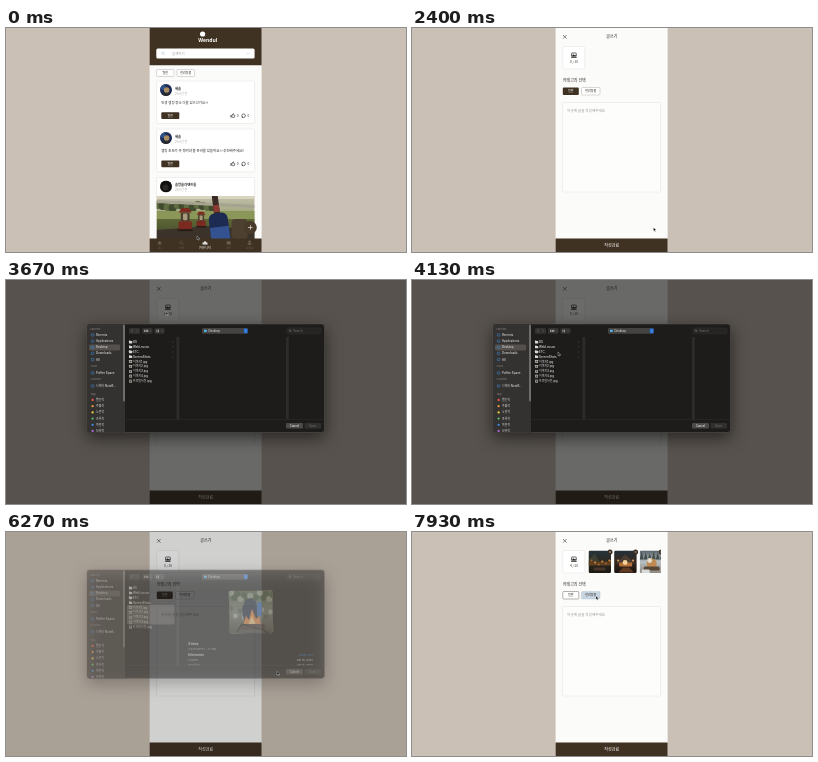
Animation, 400 px wide and 224 px high, one loop 8 s. Source, as an HTML page with a canvas:

```html
<!DOCTYPE html>
<html lang="ko">
<head>
<meta charset="utf-8">
<title>Camping community</title>
<style>
html, body { margin: 0; width: 100%; height: 100%; overflow: hidden; background: #cbc0b5; }
canvas { display: block; width: 400px; height: 224px; }
</style>
</head>
<body>
<canvas id="stage"></canvas>
<script>
const LOOP = 8000;
const BEIGE = '#cbc0b5', BROWN = '#403223', PAPER = '#fbfbfa', LINE = '#e2e1df', INK = '#2b2723', GREY = '#9b9996';
const KR = '"Noto Sans CJK KR", "Noto Sans CJK JP", "Noto Sans CJK", sans-serif';
const UI = 'Inter, "Noto Sans CJK KR", "Noto Sans CJK JP", sans-serif';

const canvas = document.getElementById('stage');
const ctx = canvas.getContext('2d');
const ratio = window.devicePixelRatio || 1;
canvas.width = 400 * ratio;
canvas.height = 224 * ratio;

const clamp = v => Math.max(0, Math.min(1, v));
const span = (t, a, b) => clamp((t - a) / (b - a));
const ease = p => p * p * (3 - 2 * p);

// Keys are [time, value, value, ...]
function track(keys, t) {
  let i = 0;
  while (i < keys.length - 2 && t >= keys[i + 1][0]) i++;
  const a = keys[i], b = keys[i + 1];
  const p = ease(span(t, a[0], b[0]));
  return a.slice(1).map((v, k) => v + (b[k + 1] - v) * p);
}

function box(x, y, w, h, r, fill, stroke, width = 0.5) {
  ctx.beginPath();
  ctx.roundRect(x, y, w, h, r);
  if (fill) { ctx.fillStyle = fill; ctx.fill(); }
  if (stroke) { ctx.strokeStyle = stroke; ctx.lineWidth = width; ctx.stroke(); }
}

function dot(x, y, r, fill, stroke, width = 0.5) {
  ctx.beginPath();
  ctx.arc(x, y, r, 0, 7);
  if (fill) { ctx.fillStyle = fill; ctx.fill(); }
  if (stroke) { ctx.strokeStyle = stroke; ctx.lineWidth = width; ctx.stroke(); }
}

function poly(points, fill, stroke, width = 0.5) {
  ctx.beginPath();
  for (let i = 0; i < points.length; i += 2) ctx.lineTo(points[i], points[i + 1]);
  if (fill) { ctx.fillStyle = fill; ctx.fill(); }
  if (stroke) { ctx.strokeStyle = stroke; ctx.lineWidth = width; ctx.stroke(); }
}

// Text is set large and scaled down so that small sizes keep their true widths
function text(s, x, y, size, color, align = 'left', weight = 400, font = KR) {
  ctx.save();
  ctx.translate(x, y);
  ctx.scale(size / 40, size / 40);
  ctx.font = `${weight} 40px ${font}`;
  ctx.textAlign = align;
  ctx.textBaseline = 'alphabetic';
  ctx.fillStyle = color;
  ctx.fillText(s, 0, 14);
  ctx.restore();
}
const ui = (s, x, y, color = '#dcdbd9', size = 2.9, align = 'left', weight = 500) =>
  text(s, x, y, size, color, align, weight, UI);

function clipped(x, y, w, h, r, draw) {
  ctx.save();
  ctx.beginPath();
  ctx.roundRect(x, y, w, h, r);
  ctx.clip();
  draw();
  ctx.restore();
}

function fade(x, y, w, h, ...colors) {
  const g = ctx.createLinearGradient(0, y, 0, y + h);
  colors.forEach((c, i) => g.addColorStop(i / (colors.length - 1), c));
  ctx.fillStyle = g;
  ctx.fillRect(x, y, w, h);
}

function lens(x, y, r, color) {
  dot(x, y, r, null, color, 0.45);
  poly([x + r * 0.7, y + r * 0.7, x + r * 1.7, y + r * 1.7], null, color, 0.45);
}

function chip(label, x, y, w, h, style) {
  const [fill, stroke, color] = {
    dark: [BROWN, null, '#fff'],
    light: ['#fff', '#b5b1ac', INK],
    strong: ['#fff', '#6e655c', INK],
    blue: ['#c8d5e2', '#b9c6d3', INK]
  }[style];
  box(x, y, w, h, 1, fill, stroke);
  text(label, x + w / 2, y + h / 2, 3.05, color, 'center', 500);
}

// ---- list page ----

function lantern(x, y, s) {
  ctx.save();
  ctx.translate(x, y);
  ctx.scale(s, s);
  poly([0, 5, 3, 1, 9, 1, 12, 5], '#7d2a20');
  box(2, 5, 8, 8, 1, '#4b3d30');
  box(4, 6, 4, 6, 1, '#a99a7c');
  box(0, 13, 12, 8, 1, '#7a2a20');
  box(-1, 20, 14, 2, 1, '#2e1c17');
  ctx.restore();
}

function beachPhoto(y) {
  clipped(151, y, 98, 78, 0, () => {
    fade(151, y, 98, 34, '#c2c1ad', '#a3a67f', '#6d7747');
    box(151, y, 98, 3, 0, '#d9d4bf');
    for (let i = 0; i < 12; i++) dot(152 + i * 5, y + 9 + (i * 5) % 4, 4, i % 2 ? '#3f4b2c' : '#5f6b41');
    poly([151, y + 4, 249, y + 9, 249, y + 12, 151, y + 7], '#a6a391');
    box(151, y + 15, 98, 9, 0, '#8b9659');
    fade(151, y + 23, 98, 55, '#5d6736', '#3a3b26', '#25241c');
    poly([151, y + 34, 205, y + 30, 249, y + 34, 249, y + 78, 151, y + 78], '#3b332a');
    lantern(173, y + 11, 1.1);
    lantern(191, y + 15, 0.75);
    ctx.save();
    ctx.translate(212, y + 22);
    ctx.rotate(-0.13);
    box(-3, -23, 6, 22, 2, '#3a2a25');
    box(-3, -13, 6, 7, 1, '#8a3a33');
    box(-9, -5, 19, 60, 6, '#1d2b52');
    box(-9, 9, 19, 16, 0, '#34528f');
    ctx.restore();
    box(226, y + 23, 16, 20, 4, '#4d4030');
  });
}

function actions(y) {
  chip('일반', 155.7, y - 3.5, 18, 6.8, 'dark');
  box(226.2, y - 1, 2.9, 2.6, 0.6, null, INK, 0.6);
  poly([227, y - 1, 227.9, y - 2.4], null, INK, 0.8);
  box(225, y - 0.9, 0.8, 2.6, 0, INK);
  text('0', 231.2, y, 3.3, INK);
  dot(238, y - 0.1, 1.8, null, INK, 0.6);
  poly([236.4, y + 0.5, 236.2, y + 2, 237.6, y + 1.6], INK);
  text('0', 242, y, 3.3, INK);
}

function post(y, h, name, body, dark) {
  box(151, y, 98, h, 1, '#fff', LINE);
  clipped(154.4, y + 3, 12, 12, 6, () => {
    box(154, y + 3, 13, 12, 0, dark ? '#11100f' : '#1b2a52');
    if (dark) { dot(160, y + 10, 3, '#2b2725'); return; }
    dot(157, y + 6, 3, '#2f5188');
    dot(161, y + 9, 2.8, '#a98d5f');
    box(156, y + 12, 9, 4, 2, '#2a2a2c');
  });
  text(name, 169.4, y + 7.6, 3.3, INK, 'left', 700);
  text('20시간 전', 169.4, y + 12.8, 3, '#aaa8a5');
  if (body) text(body, 155.6, y + 22, 3.42, INK, 'left', 500);
}

function navBar() {
  box(144, 210.6, 112, 13.4, 0, BROWN);
  const dim = '#6b5e51';
  ['홈', '검색', '', '장터', '내정보'].forEach((s, i) => {
    if (s) text(s, [154, 176, 199, 223, 244][i], 220, 2.6, dim, 'center');
  });
  poly([152, 215, 154, 213, 156, 215, 155.3, 216.5, 152.7, 216.5], dim);
  lens(175.6, 214.6, 1.4, dim);
  box(221, 213.3, 4, 3.2, 0.6, dim);
  dot(244, 213.8, 1.2, dim);
  box(242, 215.2, 4, 1.6, 0.8, dim);
  dot(199.4, 214.2, 1, '#fff');
  dot(197.6, 214.9, 0.7, '#fff');
  dot(201.2, 214.9, 0.7, '#fff');
  box(196.9, 215.3, 5, 1.2, 0.6, '#fff');
  text('커뮤니티', 199.4, 219.6, 3.2, '#fff', 'center', 500);
}

function listPage(t) {
  const [scroll] = track([[70, 0], [530, 34], [670, 34], [1470, 50], [1530, 50], [2330, 0]], t);
  box(144, 0, 112, 224, 0, PAPER);
  clipped(144, 37, 112, 174, 0, () => {
    ctx.translate(0, -scroll);
    chip('일반', 151, 41.5, 17.4, 7, 'light');
    chip('반려동물', 171.3, 41.5, 17.7, 7, 'light');
    post(53, 42.5, '새솔', '인생 캠핑 장소 다들 있으신가요??');
    actions(87.8);
    post(101, 42.8, '새솔', '캠핑 초보가 꼭 챙겨야 할 준비물 있을까요?? 추천해주세요!!');
    actions(136);
    post(149.5, 113, '솔방울과텐트들', '', true);
    beachPhoto(168);
    actions(254.5);
  });
  box(144, 0, 112, 37.3, 0, BROWN);
  dot(197, 6, 2.6, '#fff');
  text('Wendul', 202.2, 12.3, 5, '#fff', 'center', 700, '"Open Sans", sans-serif');
  box(150.7, 20.5, 98.3, 10, 1.5, '#fff');
  lens(157.2, 25.1, 1.3, '#a9bac5');
  text('검색하기', 166.5, 25.5, 3.4, GREY);
  poly([241, 25, 242.4, 26.2, 243.8, 25], null, '#b9b6b2', 0.5);
  dot(244.7, 199.5, 6.5, '#4a3a29');
  box(242.4, 199.2, 4.6, 0.6, 0, '#fff');
  box(244.4, 197.2, 0.6, 4.6, 0, '#fff');
  navBar();
}

// ---- write page ----

function nightCamp(x, y) {
  fade(x, y, 23, 23, '#26343c', '#2c2a20', '#1b1712');
  poly([x, y + 10, x + 6, y + 3, x + 11, y + 11], '#3c4133');
  box(x, y + 11, 23, 4, 0, '#5e3f22');
  for (let i = 0; i < 6; i++) dot(x + 3 + i * 3.6, y + 10 + (i * 7) % 5, 1.1, i % 2 ? '#d98a3d' : '#a85f2a');
  box(x + 5, y + 17, 12, 3, 1, '#46372a');
}

function lanternCamp(x, y) {
  fade(x, y, 23, 23, '#22303a', '#37281c', '#17120f');
  poly([x + 2, y + 13, x + 11, y + 4, x + 21, y + 13], '#4a3d30');
  box(x + 5, y + 12, 13, 4, 1, '#b5713a');
  dot(x + 11, y + 12, 2.4, '#f3d59b');
  dot(x + 4, y + 10, 1.1, '#d89a55');
  dot(x + 19, y + 10, 1.1, '#d89a55');
  poly([x + 4, y + 22, x + 9, y + 17, x + 15, y + 17, x + 20, y + 22], '#5d3a22');
}

function snowCamp(x, y) {
  fade(x, y, 23, 23, '#57636a', '#b8bfc2', '#8b857d');
  for (let i = 0; i < 6; i++) poly([x + i * 4, y + 9, x + 2 + i * 4, y + 1 + i % 3, x + 4 + i * 4, y + 9], '#434d4b');
  dot(x + 12, y + 13, 5, '#c08b52');
  dot(x + 10, y + 10, 2.4, '#e4dccd');
  box(x + 4, y + 16, 16, 4, 1.5, '#594736');
  box(x + 2, y + 19, 8, 4, 1, '#d7d9d8');
}

function writePage(t) {
  const loaded = t >= 6730, pets = t >= 7730;
  box(144, 0, 112, 224, 0, PAPER);
  poly([151.4, 7, 155, 10.6], null, INK, 0.55);
  poly([155, 7, 151.4, 10.6], null, INK, 0.55);
  text('글쓰기', 200.2, 9, 4, INK, 'center', 500);

  box(151.2, 18.5, 22, 22.5, 1.5, '#fff', LINE);
  box(159.9, 25, 4.8, 3.6, 0.6, null, INK, 0.7);
  poly([160.2, 28, 161.8, 26.3, 162.9, 27.3, 163.6, 26.7, 164.5, 28], INK);
  box(159.4, 29, 5.8, 0.8, 0.4, INK);
  text(`${loaded ? 4 : 0} / 10`, 162.3, 33.6, 3.2, INK, 'center', 500);

  if (loaded) {
    clipped(150, 15, 99.3, 30, 0, () => {
      [nightCamp, lanternCamp, snowCamp].forEach((photo, i) => {
        const x = 176.9 + i * 25.6;
        clipped(x, 18.5, 22.5, 22.5, 1.5, () => photo(x, 18.5));
        dot(x + 21.5, 20, 2.5, '#3a2d20');
        poly([x + 20.7, 19.2, x + 22.3, 20.8], null, '#fff', 0.4);
        poly([x + 22.3, 19.2, x + 20.7, 20.8], null, '#fff', 0.4);
      });
    });
  }

  text('카테고리 선택', 151.2, 52.6, 4, INK, 'left', 500);
  chip('일반', 151.2, 59.5, 16, 7.5, pets ? 'strong' : 'dark');
  chip('반려동물', 169.9, 59.5, 18.5, 7.5, pets ? 'blue' : 'light');
  box(151, 74.5, 98, 89.5, 1, '#fdfdfc', LINE);
  text('이곳에 글을 작성해주세요', 155.5, 82.5, 3.6, GREY);
  box(144, 210.5, 112, 13.5, 0, BROWN);
  text('작성완료', 200.2, 217.4, 4.1, '#fff', 'center', 500);
}

// ---- file dialog ----

function sidebar() {
  box(81, 44, 38, 108.5, [3, 0, 0, 3], '#343230');
  box(117, 44.5, 2, 77, 1, '#6f6c69');
  box(83, 64.5, 31, 6, 1.2, '#54514d');
  for (const [s, y] of [['Favorites', 49.6], ['Cloud', 86.3], ['Locations', 99.6], ['Tags', 114]])
    ui(s, 84.5, y, '#7f7c78', 2.3);
  const places = [['Recents', 55], ['Applications', 61.2], ['Desktop', 67.4], ['Downloads', 73.4], ['All', 79.6],
    ['Puffen Space', 93], ['나래의 NoteB…', 106]];
  for (const [s, y] of places) {
    box(85.3, y - 1.2, 2.6, 2.3, 0.7, null, '#3f83c8', 0.6);
    ui(s, 90, y);
  }
  const tags = [['빨간색', '#f0564a'], ['주황색', '#f29a3a'], ['노란색', '#f3ce48'],
    ['초록색', '#5cc065'], ['파란색', '#3f8cf0'], ['보라색', '#a969d0']];
  tags.forEach(([s, c], i) => {
    dot(86.6, 120 + i * 6.2, 1.15, c);
    ui(s, 90, 120 + i * 6.2);
  });
}

function toolbar() {
  for (const [x, w] of [[123, 11], [136, 10.5], [148.5, 10]]) box(x, 48, w, 5.8, 1.2, '#333231');
  poly([126.6, 49.8, 125.4, 50.9, 126.6, 52], null, '#888', 0.5);
  poly([130.4, 49.8, 131.6, 50.9, 130.4, 52], null, '#666', 0.5);
  for (const x of [138.3, 139.8, 141.3]) box(x, 49.7, 0.9, 2.4, 0, '#bbb');
  for (const x of [150.4, 152]) for (const y of [49.7, 51.2]) box(x, y, 1, 1, 0, '#bbb');
  for (const x of [143.6, 155.4]) poly([x, 50.5, x + 0.8, 51.4, x + 1.6, 50.5], null, '#888', 0.4);
  box(196, 48, 46, 5.8, 1.2, '#444341');
  box(198, 49.7, 2.8, 2.3, 0.4, '#55b3ec');
  ui('Desktop', 202.5, 51);
  box(237.8, 48.6, 3.8, 4.6, 0.9, '#1767d8');
  poly([238.9, 50.5, 239.7, 49.6, 240.5, 50.5], null, '#fff', 0.4);
  poly([238.9, 51.4, 239.7, 52.3, 240.5, 51.4], null, '#fff', 0.4);
  box(281, 48, 34, 5.8, 1.2, '#252423', '#383634', 0.4);
  lens(284, 50.6, 0.9, '#8a8885');
  ui('Search', 287, 51, '#757370', 2.9, 'left', 400);
}

function files(count, active) {
  if (count) box(121, 79, 47.5, 4.9 * count, 0.8, active ? '#0b50c4' : '#4d4b49');
  const names = ['DS', 'WebLesson', 'ETC.', 'ScreenShots', '이미지1.jpg', '이미지2.jpg', '이미지3.jpg', '이미지4.jpg', '프로필사진.jpg'];
  names.forEach((s, i) => {
    const y = 62 + i * 4.88;
    if (i < 4) {
      box(123, y - 1, 3.2, 2.4, 0.4, '#d5d8d6');
      box(123, y - 1.5, 1.5, 1, 0.3, '#d5d8d6');
      poly([166.4, y - 0.8, 167.2, y, 166.4, y + 0.8], null, '#666', 0.4);
    } else {
      box(123.2, y - 1.4, 2.8, 2.8, 0.2, '#d8d6d2');
      box(123.6, y - 1, 2, 2, 0, '#59544c');
    }
    ui(s, 127, y, '#e2e1df');
  });
}

function firePhoto() {
  ctx.save();
  ctx.translate(245, 86);
  ctx.rotate(-0.05);
  box(-21.5, -21, 43, 42, 0, '#5a604f');
  ctx.rotate(0.08);
  box(-21.5, -21, 43, 42, 0, '#33382d');
  ctx.restore();
  clipped(223.5, 65, 43, 42, 0, () => {
    fade(223, 64, 45, 44, '#4c5a37', '#6b7163', '#3b3830');
    for (let i = 0; i < 14; i++) dot(225 + i * 3.2, 67 + (i * 5) % 9, 3, i % 3 ? '#35452a' : '#8b927a');
    for (let i = 0; i < 10; i++) dot(225 + i * 4.4, 83 + (i * 7) % 12, 2.4, i % 2 ? '#9ea29a' : '#4d5247');
    poly([236, 82, 240, 74, 245, 72, 250, 76, 253, 90, 248, 97, 238, 96], '#1e2738');
    box(251, 76, 5, 14, 1.5, '#2f5fa8');
    poly([237, 99, 240, 90, 243, 94, 246, 83, 250, 93, 253, 90, 255, 99], '#dd7a33');
    poly([242, 99, 246, 90, 250, 99], '#f6c877');
    box(234, 98, 25, 6, 2, '#3c2c25');
    poly([231, 106, 236, 98, 257, 104, 262, 107], null, '#15120f', 1.2);
  });
}

function preview() {
  firePhoto();
  ui('4 items', 182, 118, '#eee', 2.9, 'left', 700);
  ui('4 documents - 4.1 MB', 182, 123, '#93918e', 2.7);
  ui('Information', 182, 128.6, '#e6e5e3', 2.8, 'left', 700);
  ui('Show Less', 307, 128.6, '#2f6fc4', 2.7, 'right');
  ui('Created', 182, 134, '#93918e', 2.7);
  ui('Jun 16, 2020', 307, 134, '#dcdbd9', 2.7, 'right');
  ui('Modified', 182, 139, '#93918e', 2.7);
  ui('Jun 16, 2020', 307, 139, '#dcdbd9', 2.7, 'right');
}

function dialogContent(t) {
  const count = t < 4800 ? 0 : t < 5070 ? 1 : 4;
  const active = t < 6130;
  box(81, 44, 237.5, 108.5, 3, '#1d1c1b', '#5a5754', 0.5);
  sidebar();
  toolbar();
  clipped(119.5, 57, 198.7, 82.5, 0, () => {
    const gutters = count === 4 ? [170.5] : [170.5, 280];
    for (const x of gutters) box(x, 57, 2.8, 83, 0, '#2d2c2b');
    files(count, active);
    if (count === 4) preview();
  });
  box(119.5, 139.3, 199, 0.4, 0, '#2e2c2b');
  box(280, 143, 17, 5.5, 1.1, '#4c4a48');
  ui('Cancel', 288.5, 145.8, '#f0efed', 2.8, 'center');
  const ready = count && active;
  box(298.5, 143, 16.5, 5.5, 1.1, ready ? '#1463dc' : '#30302e');
  ui('Open', 306.7, 145.8, ready ? '#fff' : '#6b6966', 2.8, 'center');
}

// The dialog is painted to its own layer so that it fades as one sheet
const layer = document.createElement('canvas');
layer.width = canvas.width;
layer.height = canvas.height;
const layerShot = layer.getContext('2d');

function dialogShown(t) {
  return t < 5000 ? span(t, 3470, 3670) : 1 - span(t, 6130, 6330);
}

function storeDialog(t) {
  ctx.clearRect(0, 0, 400, 224);
  dialogContent(t);
  layerShot.clearRect(0, 0, layer.width, layer.height);
  layerShot.drawImage(canvas, 0, 0);
}

function showDialog(shown) {
  box(0, 0, 400, 224, 0, `rgba(14, 14, 13, ${0.61 * shown})`);
  ctx.save();
  ctx.globalAlpha = Math.min(1, 1.5 * shown);
  ctx.shadowColor = 'rgba(0, 0, 0, 0.55)';
  ctx.shadowBlur = 16 * ratio;
  ctx.shadowOffsetY = 5 * ratio;
  ctx.drawImage(layer, 0, -8.6 * (1 - shown), 400, 224);
  ctx.restore();
}

// ---- pointer ----

const path = [[70, 191, 208], [530, 257, 150], [1530, 257, 150], [2330, 241.5, 199.5], [2730, 241.5, 199.5],
  [3200, 160.5, 29.5], [3600, 160.5, 29.5], [4130, 146, 72], [4330, 142, 64], [4530, 126, 83],
  [4800, 127, 81], [5070, 129, 96], [5530, 303, 147], [5600, 303, 147], [5730, 312.5, 146.8], [6100, 312.5, 146.8],
  [6270, 271, 139.5], [6730, 248, 70], [7130, 244, 36], [7400, 244, 36], [7730, 184, 64]];

function pointer(t) {
  const [x, y] = track(path, t);
  poly([x, y, x, y + 3.6, x + 0.9, y + 2.9, x + 1.5, y + 4.2, x + 2.1, y + 3.9, x + 1.5, y + 2.6, x + 2.7, y + 2.6, x, y],
    '#000', '#fff', 0.35);
}

function draw(t) {
  ctx.setTransform(ratio, 0, 0, ratio, 0, 0);
  const shown = dialogShown(t);
  if (shown) storeDialog(t);
  box(0, 0, 400, 224, 0, BEIGE);
  ctx.save();
  ctx.translate(-0.4, 0);
  if (t < 2400) listPage(t); else writePage(t);
  ctx.restore();
  if (shown) showDialog(shown);
  pointer(t);
}

const start = performance.now();
function tick() {
  draw((performance.now() - start) % LOOP);
  requestAnimationFrame(tick);
}
tick();
</script>
</body>
</html>
```
